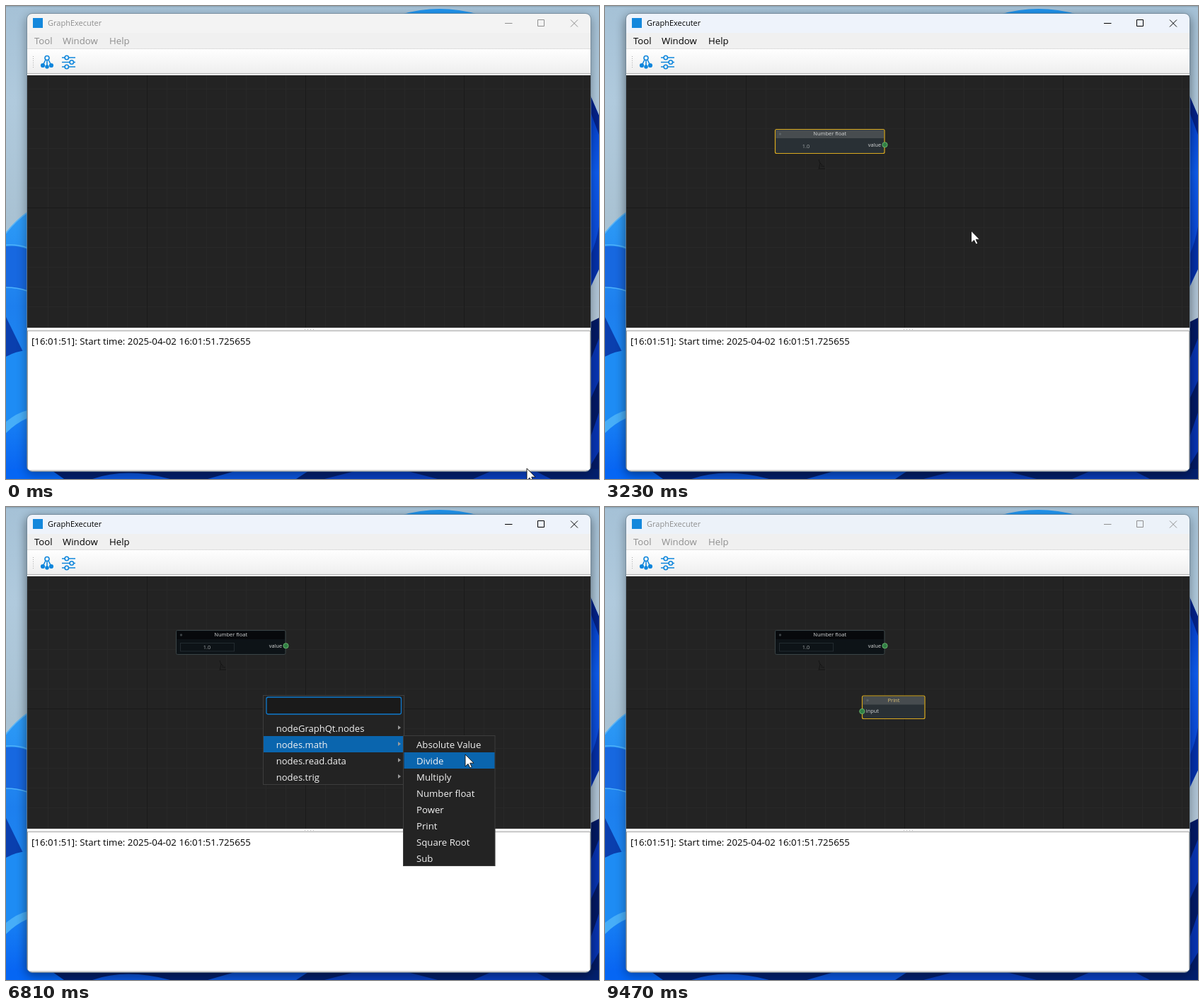
An HTML page for the animation above (9540 ms loop, 838 by 669 pixels).

```html
<!DOCTYPE html>
<html lang="en">
<head>
<meta charset="utf-8">
<title>GraphExecuter</title>
<style>
  html, body { margin: 0; width: 100%; height: 100%; overflow: hidden; background: #a9c5da; }
  svg { display: block; font-family: "Open Sans", "Noto Sans", sans-serif; font-size: 13.2px; }
  .frame { --ink: #8f8f8f; --bar: #f3f3f3; }
  .frame.active { --ink: #000; --bar: #eef3fb; }
  .frame.fading { --bar: #ecf2f9; }
  .ink { fill: var(--ink); }
  .ctl { fill: none; stroke: var(--ink); }
  .icon { fill: none; stroke: #0f86dc; stroke-width: 1.6; }
  .shadow { filter: blur(7px); opacity: .3; }
  .active + .none, .frame.active .shadow { opacity: .42; }
  .node { font-size: 7.4px; fill: #d4d6d6; }
  .node .box { fill: #0d1317; stroke: #3a4446; }
  .node .head { fill: #07090c; }
  .node .field { fill: none; stroke: #232b30; }
  .node.on .box { fill: #293035; stroke: #d9a91f; stroke-width: 1.2; }
  .node.on .head { fill: #474c4f; }
  .node.on .field { stroke: none; }
  .node.on .dot { fill: #5b6265; }
  .dot { fill: #3b4245; }
  .port { fill: #317f45; stroke: #67b56b; }
</style>
</head>
<body>
<svg width="838" height="669" viewBox="0 0 838 669">
  <defs>
    <linearGradient id="sky" x2="0" y2="1">
      <stop offset="0" stop-color="#a5c1d6"/><stop offset=".2" stop-color="#b0cadd"/>
      <stop offset=".45" stop-color="#a9c2d3"/><stop offset=".7" stop-color="#b5c8da"/>
    </linearGradient>
    <linearGradient id="petal" x2="0" y2="1">
      <stop offset="0" stop-color="#2d9bf6"/><stop offset=".35" stop-color="#1d7fee"/>
      <stop offset=".7" stop-color="#1e8bf5"/><stop offset="1" stop-color="#0560f2"/>
    </linearGradient>
    <linearGradient id="deep" x2="0" y2="1">
      <stop offset="0" stop-color="#0438c0"/><stop offset=".4" stop-color="#0d5cf0"/>
      <stop offset="1" stop-color="#0a3fca"/>
    </linearGradient>
    <linearGradient id="tools" x2="0" y2="1">
      <stop offset="0" stop-color="#fff"/><stop offset="1" stop-color="#eee"/>
    </linearGradient>
    <clipPath id="view"><rect x="30" y="98" width="796" height="357"/></clipPath>
    <clipPath id="round"><rect x="30" y="11" width="796" height="647" rx="7"/></clipPath>
  </defs>

  <g id="wallpaper">
    <rect width="838" height="669" fill="url(#sky)"/>
    <path d="M0 0H838V1.500H0Z" fill="#8fa9bb"/>
    <path d="M558 12Q612-4 668 12Z" fill="#2094ee"/>
    <path d="M0 322Q14 304 30 293V669H0Z" fill="url(#petal)"/>
    <path d="M0 340Q16 338 30 344V402Q14 398 0 399Z" fill="#1768e0"/>
    <path d="M0 398Q16 398 30 403M0 338Q16 337 30 342M0 321Q14 303 30 292" fill="none" stroke="#4db2fb" stroke-width="1.500"/>
    <path d="M0 440L24 489L0 496Z" fill="#0a3fae"/>
    <path d="M0 496Q14 488 30 487V572Q14 580 0 594Z" fill="#1e8cf4"/>
    <path d="M0 588Q16 575 30 572V583Q14 590 0 604Z" fill="#47aef8"/>
    <path d="M826 127L838 155V372L826 398Z" fill="url(#deep)"/>
    <path d="M826 127L838 155V182L826 150Z" fill="#04238a"/>
    <path d="M826 352Q834 335 838 312V372L826 396Z" fill="#0431ab"/>
    <path d="M826 447L838 441V669H826Z" fill="#031a66"/>
    <path d="M826 500L838 470V530L826 556ZM826 610L838 575V630L826 650Z" fill="#0835b4"/>
    <path d="M0 655H838V669H0Z" fill="#03206f"/>
    <path d="M0 655H62L82 669H0Z" fill="#0566f4"/>
    <path d="M122 669Q170 652 232 669ZM285 669L330 656H430L410 669Z" fill="#0c55dc"/>
    <path d="M450 669L500 656H560L610 669ZM660 669L690 656H745L770 669Z" fill="#0a3fc0"/>
  </g>

  <g id="frame" class="frame">
    <rect class="shadow" x="28" y="14" width="800" height="649" rx="9"/>
    <g clip-path="url(#round)">
      <rect x="30" y="11" width="796" height="647" fill="#f0f0f0"/>
      <rect x="30" y="11" width="796" height="27" style="fill:var(--bar)"/>
      <rect x="30" y="60" width="796" height="36" fill="url(#tools)"/>
      <path d="M30 60.500H826" stroke="#dedede"/>
      <path d="M30 95.500H826" stroke="#b4b4b4"/>
      <path d="M30 97H826" stroke="#fff" stroke-width="2"/>
      <rect x="30" y="98" width="796" height="357" fill="#232323"/>
      <g id="grid" clip-path="url(#view)" fill="none"></g>
      <rect x="30" y="455" width="796" height="5" fill="#f4f4f4"/>
      <path d="M422 457.500H438" stroke="#b5b5b5" stroke-dasharray="1 3"/>
      <rect x="30.500" y="459.500" width="795" height="197.500" fill="#fff" stroke="#a6a6a6"/>
    </g>
    <rect x="29.500" y="10.500" width="797" height="648" rx="7.500" fill="none" stroke="#6f8494" stroke-opacity=".75"/>
    <rect x="38" y="17" width="14" height="14" fill="#1488dc"/>
    <text class="ink" x="59" y="28" font-size="11">GraphExecuter</text>
    <path class="ctl" d="M705 24.500H715.500M751.500 19.500H760.500V28.500H751.500ZM798 19.500L808 29.500M808 19.500L798 29.500"/>
    <text class="ink" x="40" y="53.500">Tool</text>
    <text class="ink" x="80" y="53.500">Window</text>
    <text class="ink" x="146" y="53.500">Help</text>
    <path d="M38.500 71V88" stroke="#a9a9a9" stroke-dasharray="1 2"/>
    <g class="icon">
      <circle cx="58" cy="73.500" r="3"/>
      <path d="M56 76L53 82M58 77V84M60 76L63 82"/>
      <g fill="#0f86dc"><circle cx="52" cy="84" r="2.300"/><circle cx="58" cy="86" r="2"/><circle cx="64" cy="84" r="2.300"/></g>
      <path d="M79 73H83M88.500 73H98M79 79.500H90M95.500 79.500H98M79 86H83M88.500 86H98"/>
      <circle cx="85.800" cy="73" r="2.700"/><circle cx="92.800" cy="79.500" r="2.700"/><circle cx="85.800" cy="86" r="2.700"/>
    </g>
    <text x="36" y="478.500" font-size="13.250">[16:01:51]: Start time: 2025-04-02 16:01:51.725655</text>
  </g>

  <g id="number" class="node">
    <rect class="box" x="240.500" y="174.500" width="154.500" height="34" rx="2"/>
    <rect class="head" x="241.500" y="175.500" width="152.500" height="11.500"/>
    <circle class="dot" cx="247.500" cy="181" r="1.700"/>
    <rect class="field" x="246.500" y="192.500" width="76" height="11.500"/>
    <text x="317.700" y="183.300" text-anchor="middle" font-size="7.500">Number float</text>
    <text x="284" y="201" text-anchor="middle" fill="#a2a7a9">1.0</text>
    <text x="371.800" y="199">value</text>
    <circle class="port" cx="395.500" cy="196.300" r="3.600"/>
    <path d="M302 217L304 223L302 231M304 222L307 225M303 230H311M305 226L310 227" fill="none" stroke="#131313" stroke-width=".9"/>
  </g>

  <g id="print" class="node on">
    <rect class="box" x="363.500" y="267" width="88.500" height="32.500" rx="2"/>
    <rect class="head" x="364.500" y="268" width="86.500" height="11.500"/>
    <circle class="dot" cx="371" cy="273.500" r="1.700"/>
    <text x="408" y="276" text-anchor="middle" font-size="7.600" fill="#dcc274">Print</text>
    <text x="368.800" y="291.300">input</text>
    <circle class="port" cx="363.300" cy="289" r="3.600"/>
  </g>

  <g id="menu" fill="#f2f2f2">
    <rect x=".5" y=".5" width="199" height="126" fill="#232323" stroke="#3d3d3d"/>
    <rect x="5" y="3" width="190.500" height="24" rx="2.500" fill="#1a1a1a" stroke="#0f79cc" stroke-width="1.300"/>
    <path id="caret" d="M12.500 8V23" stroke="#fff" stroke-width="1.300"/>
    <rect id="pick" x="1" width="198" height="23" fill="#0a65ae"/>
    <g id="groups"></g>
    <g id="sub">
      <rect x="198.500" y="57.500" width="129.500" height="184" fill="#232323" stroke="#3d3d3d"/>
      <rect id="subPick" x="199.500" width="128" height="23" fill="#0a65ae"/>
      <g id="items"></g>
    </g>
  </g>

  <path id="cursor" d="M0 0V17L4 13.300L6.800 19L9.300 17.900L6.700 12.200H12Z" fill="#fff" stroke="#111" stroke-width=".9"/>
</svg>
<script>
const LOOP = 9540, FIRST = 130, STEP = 155.67, ROW = 23;
const $ = id => document.getElementById(id);

const make = (parent, tag, attrs, text = '') => {
  const el = document.createElementNS('http://www.w3.org/2000/svg', tag);
  for (const key in attrs) el.setAttribute(key, attrs[key]);
  el.textContent = text;
  return parent.appendChild(el);
};

function drawGrid() {
  const lines = (gap, x0, y0) => {
    let d = '';
    for (let x = x0; x < 826; x += gap) d += `M${x}.5 98V455`;
    for (let y = y0; y < 455; y += gap) d += `M30 ${y}.5H826`;
    return d;
  };
  make($('grid'), 'path', { d: lines(28, 31, 117), stroke: '#282828' });
  make($('grid'), 'path', { d: lines(224, 199, 285), stroke: '#1a1a1a' });
}

function fillMenus() {
  ['nodeGraphQt.nodes', 'nodes.math', 'nodes.read.data', 'nodes.trig'].forEach((name, i) => {
    const y = 47 + i * ROW;
    make($('groups'), 'text', { x: 18.7, y: y + 5, 'font-size': 13.05 }, name);
    make($('groups'), 'path', { d: `M191 ${y - 4}L195 ${y - 1}L191 ${y + 2}Z`, fill: '#9a9a9a' });
  });
  ['Absolute Value', 'Divide', 'Multiply', 'Number float', 'Power', 'Print', 'Square Root', 'Sub']
    .forEach((name, i) => make($('items'), 'text', { x: 217, y: 75 + i * 22.95 }, name));
}

// pointer path: step, x, y
const path = [
  [0, 736, 654], [1, 720, 630], [5, 240, 174], [6, 240, 174], [7, 280, 240], [9, 287, 250],
  [11, 287, 250], [14, 470, 250], [16, 505, 326], [18, 508, 312], [19, 508, 312], [21, 517.500, 318],
  [22, 505, 322], [24, 363, 266], [26, 363, 266], [28, 425, 318], [30, 443, 328], [32, 575, 336],
  [34, 630, 345], [37, 645, 372], [39, 650, 401], [41, 650, 392], [44, 649, 350], [46, 648, 392],
  [49, 643, 423], [50, 643, 423], [52, 640, 449], [53, 640, 449], [57, 650, 470], [58, 665, 510],
  [60, 725, 650], [61, 760, 700]
];

// open and close steps, the step before the submenu fades in, corner
const menus = [
  { open: 6, close: 19, sub: 8, x: 240, y: 174 },
  { open: 26, close: 54, sub: 28, x: 363, y: 266 }
];

function pointer(n) {
  const i = Math.max(1, path.findIndex(p => p[0] >= n));
  const [n0, x0, y0] = path[i - 1], [n1, x1, y1] = path[i];
  const f = (n - n0) / (n1 - n0);
  return [x0 + (x1 - x0) * f, y0 + (y1 - y0) * f];
}

const show = (el, on) => el.setAttribute('display', on ? 'inline' : 'none');

function drawMenu(n, px, py) {
  const m = menus.find(m => n >= m.open && n < m.close);
  show($('menu'), m);
  if (!m) return;
  const x = px - m.x, y = py - m.y, fade = Math.min(1, Math.max(0, (n - m.sub) / 2));
  $('menu').setAttribute('transform', `translate(${m.x} ${m.y})`);
  show($('caret'), (n - m.open - .3) / 6.81 % 1 < .5);

  const row = fade ? 1 : Math.floor((y - 35) / ROW);
  show($('pick'), row >= 0 && row < 4);
  $('pick').setAttribute('y', 58 + (row - 1) * ROW);

  $('sub').setAttribute('opacity', fade);
  const item = Math.floor((y - 58) / ROW);
  show($('subPick'), x >= 199 && item >= 0 && item < 8);
  $('subPick').setAttribute('y', 58 + item * ROW);
}

function render(t) {
  const n = t < FIRST ? 0 : Math.min(61, 1 + Math.floor((t - FIRST + 20) / STEP));
  const [x, y] = pointer(n);
  $('cursor').setAttribute('transform', `translate(${x} ${y})`);
  $('frame').classList.toggle('active', n >= 5 && n < 61);
  $('frame').classList.toggle('fading', n === 61);
  show($('number'), n >= 19);
  $('number').classList.toggle('on', n < 23);
  show($('print'), n >= 54);
  drawMenu(n, x, y);
}

drawGrid();
fillMenus();
const start = performance.now();
(function tick() {
  render((performance.now() - start) % LOOP);
  requestAnimationFrame(tick);
})();
</script>
</body>
</html>
```
